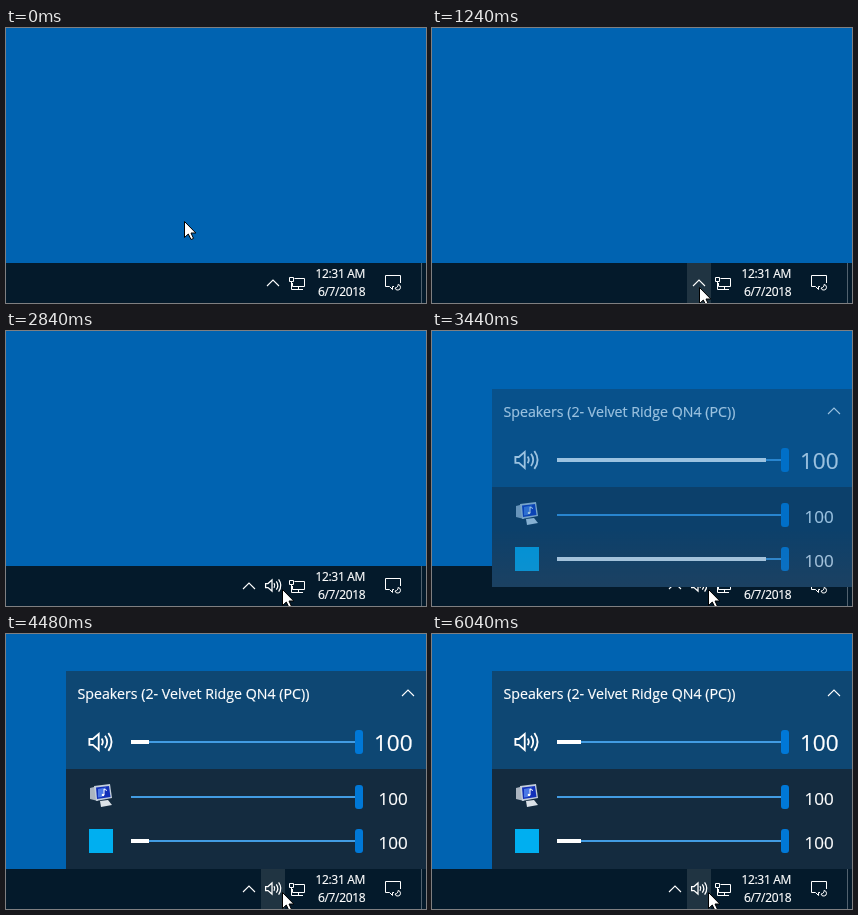
Animation, 420 px wide and 275 px high, one loop 6.12 s. Source, as an HTML page:

```html
<!DOCTYPE html>
<html lang="en">
<head>
<meta charset="utf-8">
<title>Tray volume mixer</title>
<style>
  html, body { margin: 0; width: 100%; height: 100%; overflow: hidden; background: #0063b1; }
  svg { display: block; width: 420px; height: 275px; }
  text { font-family: "Open Sans", "Noto Sans", sans-serif; fill: #fff; stroke: #fff; stroke-width: .2px; }
  .line { fill: none; stroke: #fff; }
  .clock { font-size: 12px; letter-spacing: -.35px; }
  .title { font-size: 14.2px; }
  .big { font-size: 22.5px; }
  .small { font-size: 17px; }
  .track { fill: #429ce3; }
  .thumb { fill: #0078d7; }
  .meter { fill: #fff; }
</style>
</head>
<body>
<svg viewBox="0 0 420 275">
  <defs>
    <linearGradient id="backdrop" x2="0" y2="1">
      <stop offset=".7" stop-color="#0063b1"/>
      <stop offset="1" stop-color="#28649a"/>
    </linearGradient>
    <g id="speaker" class="line" stroke-width="1.25">
      <path d="M.6 5.5H3L7 2V13L3 9.500H.6Z"/>
      <path d="M9 5.200Q10.600 7.500 9 9.800M11.300 3.300Q14.300 7.500 11.300 11.700M13.600 1.400Q18 7.500 13.600 13.600"/>
    </g>
    <path id="chevron" class="line" stroke-width="1.1" d="M-6 3L0-3L6 3"/>
  </defs>

  <rect width="420" height="275" fill="#0063b1"/>

  <g id="taskbar">
    <rect y="235" width="420" height="40" fill="#041a2b"/>
    <rect id="trayHover" x="255" y="235" width="24" height="40" fill="#203442"/>
    <use id="trayChevron" href="#chevron" x="267" y="255"/>
    <use id="traySpeaker" href="#speaker" x="259" y="247"/>
    <g class="line">
      <path d="M288.5 250.5H298.5V258.5H286.5V255M292.5 258.5V261.5M288 261.5H297"/>
      <path d="M283.5 249.5H287.5V253.5H283.5ZM285.5 254V261.5H288"/>
      <path d="M394.5 255V247.5H379.5V258.5H383.5L386.5 261.5V258.5H388"/>
      <path d="M392 256.5A2.800 2.800 0 1 1 389 260A3 3 0 0 0 392 256.5Z"/>
    </g>
    <text class="clock" x="309.5" y="250">12:31 AM</text>
    <text class="clock" x="312" y="268">6/7/2018</text>
    <rect x="415" y="235" width="1" height="40" fill="#52626f"/>
  </g>

  <g id="flyout">
    <rect x="224" y="152" width="88" height="83" fill="#001a30" opacity=".12"/>
    <rect x="225.5" y="153.5" width="83" height="81.5" fill="#001a30" opacity=".25"/>
    <rect x="227" y="155" width="80" height="80" fill="#203442"/>
    <rect id="cellHover" x="267" y="195" width="40" height="40" fill="#3b4c59"/>
    <g class="line">
      <path d="M244.5 171V167.5H250.5V171M242.5 171.5H252.5V177M242.5 171.5V183.5H247.5"/>
      <path d="M246 169.5H247M248 169.5H249M248.5 180.5L250.5 182.5L254.5 178.5"/>
    </g>
    <rect x="280" y="168" width="13" height="13" fill="#fff"/>
    <circle cx="290.5" cy="179.5" r="4.5" fill="#149447"/>
    <path class="line" d="M288.3 179.5L290 181.2L292.8 178"/>
    <circle cx="247" cy="214.5" r="6.5" fill="#fff"/>
    <use id="cellSpeaker" href="#speaker" x="279" y="207.5"/>
  </g>

  <g id="mixer">
    <rect x="60" y="37" width="360" height="198" fill="url(#backdrop)"/>
    <g id="mixerContent">
      <rect x="60" y="37" width="360" height="98" fill="#0e4773"/>
      <rect x="60" y="135" width="360" height="100" fill="#142b3f"/>
      <text class="title" x="71.5" y="65">Speakers (2- Velvet Ridge QN4 (PC))</text>
      <use href="#chevron" x="402" y="59"/>
      <use href="#speaker" transform="translate(82.5 97) scale(1.46)"/>
      <g id="soundsIcon">
        <path d="M84 154L92 152V167L84 165Z" fill="#aab4c0"/>
        <path d="M88 152L104 150L106 164L90 167Z" fill="#c3cedb"/>
        <path d="M90 153.500L103 152L104.500 163L91 165Z" fill="#1230b8"/>
        <path d="M92 155L100 153.500L96 163L92 163.500Z" fill="#4b78e6"/>
        <path d="M98 161V155L101 156.500" class="line"/>
        <circle cx="97" cy="161" r="1.300" fill="#fff"/>
        <path d="M94 167L102 166L106 171L95 173Z" fill="#dce2e8"/>
      </g>
      <rect x="83" y="195" width="24" height="24" fill="#00aff0"/>
      <g id="sliders"></g>
    </g>
  </g>

  <path id="cursor" d="M.5 .5V16.5L4.3 13L7 18.500L9.500 17.400L7 12H11.800Z"
        fill="#fff" stroke="#000" stroke-linejoin="round"/>
</svg>

<script>
const LOOP = 6120, STEP = 40;
const TRACK_X = 125, METER_WIDTH = 209;
const el = id => document.getElementById(id);
const clamp = v => Math.min(1, Math.max(0, v));
const progress = (t, start, end) => clamp((t - start) / (end - start));
const set = (id, name, value) => el(id).setAttribute(name, value);
const show = (id, on) => set(id, "visibility", on ? "visible" : "hidden");

const slider = (y, size, textX, baseline) => `
  <rect class="track" x="${TRACK_X}" y="${y - 1}" width="224" height="2"/>
  <rect class="thumb" x="349" y="${y - 12}" width="8" height="24" rx="3"/>
  <text class="${size}" x="${textX}" y="${y + baseline}">100</text>`;
const meter = y => `<rect class="meter" x="${TRACK_X}" y="${y - 2}" height="4"/>`;

el("sliders").innerHTML = slider(108, "big", 368, 9) + meter(108)
  + slider(163, "small", 372.5, 7.5) + slider(207, "small", 372.5, 7.5) + meter(207);
const meters = document.querySelectorAll(".meter");

const start = { x: 178, y: 193 };
const moves = [
  { from: 280, to: 1240, x: 267, y: 259 },  // tray chevron
  { from: 1560, to: 2040, x: 284, y: 216 }, // hidden speaker icon
  { from: 2160, to: 2720, x: 276, y: 258 }  // taskbar slot
];

function pointerAt(t) {
  const p = moves.reduce((pos, m) => {
    const u = progress(t, m.from, m.to);
    return { x: pos.x + (m.x - pos.x) * u, y: pos.y + (m.y - pos.y) * u };
  }, start);
  return { x: Math.round(p.x), y: Math.round(p.y) };
}

// The sound dips once, returns to full, then fades with a fixed half-life.
function levelAt(t) {
  const dipStart = 4080, fadeStart = 4800, halfLife = 396;
  if (t > fadeStart) return 2 ** ((fadeStart - t) / halfLife);
  return 0.53 + 0.47 * Math.cos(2 * Math.PI * progress(t, dipStart, fadeStart));
}

function draw(t) {
  const { x, y } = pointerAt(t);
  set("cursor", "transform", `translate(${x} ${y})`);

  const dragging = t >= 2160 && t < 2880;
  const pressed = t >= 3360 && t < 3520;
  const onTaskbar = y >= 235;
  const moved = t >= 2160 && onTaskbar;
  show("trayHover", onTaskbar && x >= 255 && x < 279 && !dragging && !pressed);
  show("traySpeaker", moved);
  set("trayChevron", "x", moved ? 243 : 267);

  set("flyout", "opacity", progress(t, 1320, 1480) - progress(t, 2760, 2840));
  set("flyout", "transform", `translate(${moved ? -24 : 0} 0)`);
  show("cellHover", x >= 267 && !onTaskbar);
  show("cellSpeaker", !moved);

  const rise = Math.round(50 * (1 - progress(t, 3340, 3740)) ** 3);
  show("mixer", t >= 3360);
  set("mixer", "transform", `translate(0 ${rise})`);
  set("mixerContent", "opacity", progress(t, 3340, 3505));

  const width = Math.round(METER_WIDTH * levelAt(t));
  meters.forEach(m => m.setAttribute("width", width));
}

function tick() {
  const t = performance.now() % LOOP;
  draw(Math.floor(t / STEP) * STEP);
  requestAnimationFrame(tick);
}
tick();
</script>
</body>
</html>
```
